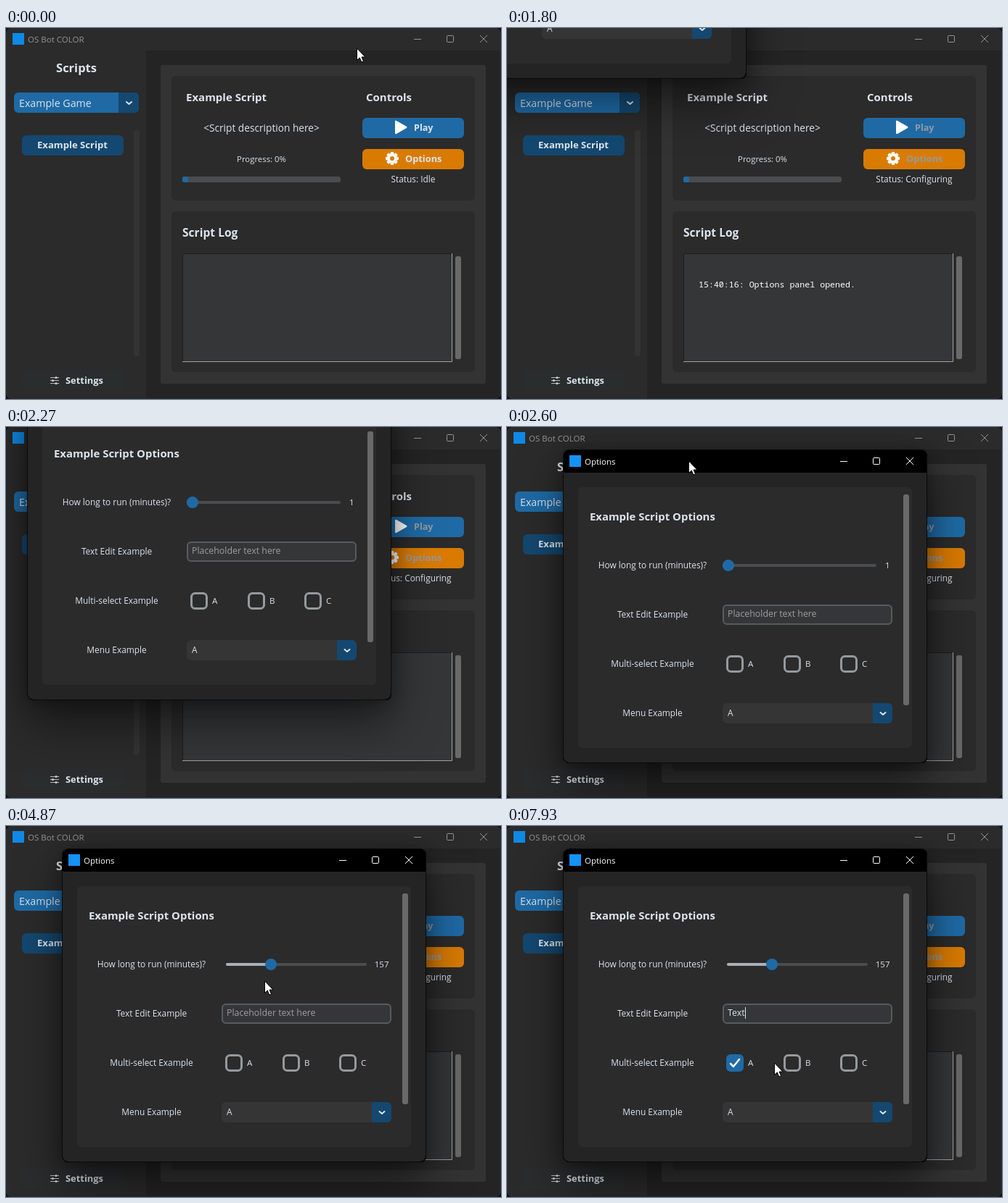
Recreate the animation shown at these times as an HTML page with a canvas. Size 682 by 512 pixels, loop 8 s.

```html
<!DOCTYPE html>
<html lang="en">
<head>
<meta charset="utf-8">
<title>Script options</title>
<style>
html, body { margin: 0; width: 100%; height: 100%; overflow: hidden; background: #10131f; }
canvas { display: block; }
</style>
</head>
<body>
<canvas id="stage" width="682" height="512"></canvas>
<script>
const ctx = document.getElementById('stage').getContext('2d');
const LOOP = 8000, STEP = 1000 / 15;
const BLUE = '#1f6aa5', NAVY = '#144870', CARD = '#2b2b2b', BODY = '#242424',
      INK = '#dce4ee', GREY = '#949a9f', FIELD = '#343638', TRACK = '#4a4d50', THUMB = '#696969';
const OPENED = 800, DRAG_START = 3430, FOCUSED = 5400, CHECKED = 7500;
const KEYS_TYPED = [5730, 6000, 6270, 6530];

// [time, x, y]
const DIALOG = [[1670, -290, -475], [1800, -249, -394], [2266, -48, -87], [2400, -12, -25], [2530, 0, 0]];
const SLIDER = [[DRAG_START, 66], [3800, 100], [4270, 161], [4400, 161], [4460, 157]];
// [time, x, y, shape until the next key]
const POINTER = [
  [0, 483, 28, 'arrow'], [530, 548, 167, 'hand'], [670, 556, 180, 'hand'], [870, 556, 180, 'hand'],
  [930, 505, 150, 'arrow'], [1200, -30, -40, 'arrow'], [1670, -40, -428, 'arrow'],
  [2266, 200, -40, 'arrow'], [2530, 250, 47, 'arrow'], [2600, 250, 47, 'arrow'],
  [3130, 318, 180, 'hand'], [3266, 331, 188, 'hand'], [DRAG_START, 331, 188, 'hand'],
  [4270, 367, 189, 'hand'], [4400, 367, 189, 'hand'], [4460, 365, 191, 'hand'],
  [4710, 365, 192, 'arrow'], [4866, 356, 214, 'arrow'], [5130, 352, 246, 'beam'],
  [5330, 351, 257, 'beam'], [6840, 351, 257, 'beam'], [7000, 342, 273, 'arrow'],
  [7270, 318, 317, 'hand'], [7400, 312, 331, 'hand'], [7660, 312, 331, 'hand'],
  [7790, 342, 329, 'arrow'], [7933, 368, 327, 'arrow'], [8000, 375, 326, 'arrow']
];

const SHAPES = {
  arrow: new Path2D('M.5 0V16.5L4.3 13L6.8 19L9.5 17.8L7 12H12Z'),
  hand: new Path2D('M-2 1Q0-2 2 1V8Q4 7 5 8.5Q7 8 8 9.5Q10 9 10.5 11V16Q10 19 8.5 21.5H0Q-2 17-6 13Q-6 10-3 12L-2 13Z'),
  beam: new Path2D('M-2.5-7.5H-.5L.5-6.5L1.5-7.5H3.5M.5-6.5V6.5M-2.5 7.5H-.5L.5 6.5L1.5 7.5H3.5')
};

function track(keys, t) {
  if (t <= keys[0][0]) return keys[0].slice(1);
  const i = keys.findIndex(k => k[0] > t);
  if (i < 0) return keys[keys.length - 1].slice(1);
  const a = keys[i - 1], b = keys[i], p = (t - a[0]) / (b[0] - a[0]);
  return a.slice(1).map((v, n) => typeof v === 'number' ? Math.round(v + (b[n + 1] - v) * p) : v);
}

function box(x, y, w, h, fill, r = 0) {
  ctx.fillStyle = fill;
  ctx.beginPath();
  ctx.roundRect(x, y, w, h, r);
  ctx.fill();
}

function outline(x, y, w, h, color, width, r = 0) {
  ctx.strokeStyle = color;
  ctx.lineWidth = width;
  ctx.beginPath();
  ctx.roundRect(x + width / 2, y + width / 2, w - width, h - width, r);
  ctx.stroke();
}

function line(points, color, width = 1) {
  ctx.strokeStyle = color;
  ctx.lineWidth = width;
  ctx.beginPath();
  points.forEach(([x, y]) => ctx.lineTo(x, y));
  ctx.stroke();
}

function text(str, x, y, size, { color = INK, bold = false, align = 'left', family = '"Open Sans", sans-serif' } = {}) {
  ctx.font = `${bold ? 700 : 400} ${size}px ${family}`;
  ctx.textAlign = align;
  ctx.fillStyle = color;
  ctx.fillText(str, x, y);
}

function disc(x, y, r, fill) {
  ctx.fillStyle = fill;
  ctx.beginPath();
  ctx.arc(x, y, r, 0, Math.PI * 2);
  ctx.fill();
}

function chevron(x, y) {
  ctx.lineCap = ctx.lineJoin = 'round';
  line([[x - 3.5, y - 1.5], [x, y + 1.5], [x + 3.5, y - 1.5]], INK, 2);
  ctx.lineCap = 'butt';
  ctx.lineJoin = 'miter';
}

function titleBar(label, x, y, right, color, logo) {
  box(x, y - 8, 16, 16, logo);
  text(label, x + 21, y + 5, 11.5, { color });
  line([[right - 96, y + .5], [right - 86, y + .5]], color);
  outline(right - 51, y - 5, 10, 10, color, 1, 1);
  line([[right - 5, y - 5], [right + 5, y + 5]], color);
  line([[right + 5, y - 5], [right - 5, y + 5]], color);
}

function gear(x, y) {
  ctx.save();
  ctx.translate(x, y);
  for (let i = 0; i < 8; i++) {
    box(-2.2, -9, 4.4, 5, '#fff', 1);
    ctx.rotate(Math.PI / 4);
  }
  ctx.restore();
  ctx.lineWidth = 4;
  ctx.strokeStyle = '#fff';
  ctx.beginPath();
  ctx.arc(x, y, 5, 0, Math.PI * 2);
  ctx.stroke();
}

function mainWindow(opened, hover) {
  box(0, 0, 682, 512, BODY, 8);
  box(0, 0, 682, 31, CARD, [8, 8, 0, 0]);
  box(0, 31, 193, 481, CARD, [0, 0, 0, 8]);
  outline(0, 0, 682, 512, '#262b3a', 1, 8);
  titleBar('OS Bot COLOR', 9, 15, 658, '#959595', '#1089e6');

  text('Scripts', 97, 61, 16.5, { bold: true, align: 'center' });
  box(11, 89, 172, 28, BLUE, 6);
  box(155, 89, 28, 28, NAVY, [0, 6, 6, 0]);
  text('Example Game', 18, 109, 14.2);
  chevron(169.5, 103.5);
  box(22, 148, 140, 28, NAVY, 6);
  text('Example Script', 91.5, 166, 13.1, { bold: true, align: 'center' });
  box(176, 141, 8, 312, '#333', 4);
  box(22, 472, 140, 28, '#2a2d2e', 6);
  [[482, 69], [486, 64.5], [490, 69]].forEach(([y, knob]) => {
    line([[61, y + .5], [73, y + .5]], '#bbb');
    disc(knob, y + .5, 1.6, '#ccc');
  });
  text('Settings', 82, 491, 12.9, { bold: true });

  box(213, 51, 448, 440, '#333', 3);
  box(228, 66, 418, 172, CARD, 6);
  box(228, 253, 418, 222, CARD, 6);
  text('Example Script', 248, 101, 15, { bold: true });
  text('Controls', 496, 101, 15, { bold: true });
  text('<Script description here>', 352, 143, 13.7, { align: 'center' });
  text('Progress: 0%', 352, 185, 11.4, { align: 'center' });
  box(243, 205, 218, 8, TRACK, 3);
  box(243, 205, 8, 8, BLUE, 3);

  const label = opened ? GREY : INK;
  box(491, 124, 140, 28, BLUE, 6);
  ctx.fillStyle = '#fff';
  ctx.fill(new Path2D('M536 129Q536 127 538 128L552 136Q553 137 552 138L538 146Q536 147 536 145Z'));
  text('Play', 562, 142, 12.6, { bold: true, color: label });
  box(491, 167, 140, 28, hover ? '#b36602' : '#d97b00', 6);
  gear(532, 180);
  text('Options', 550, 185, 12.8, { bold: true, color: label });
  text('Status: ' + (opened ? 'Configuring' : 'Idle'), 561, 213, 11.9, { align: 'center' });

  text('Script Log', 243, 288, 15.6, { bold: true });
  box(243, 311, 372, 150, FIELD);
  line([[243.5, 460], [243.5, 311.5], [614, 311.5]], '#1c1c1c');
  line([[243, 460.5], [614.5, 460.5], [614.5, 311]], '#a0a0a0');
  box(619, 315, 8, 142, THUMB, 3);
  if (opened) text('15:40:16: Options panel opened.', 264, 358, 11.62, { color: '#fff', family: '"Noto Sans Mono", monospace' });
}

function shadow(alpha, blur, dy) {
  ctx.shadowColor = `rgba(0,0,0,${alpha})`;
  ctx.shadowBlur = blur;
  ctx.shadowOffsetY = dy;
  box(78, 32, 501, 432, '#000', 8);
  ctx.shadowColor = 'transparent';
}

function slider(value, hover) {
  const extra = String(value).length - 1;
  const left = 297 + 3 * extra, right = 509 - 6 * extra;
  const knob = left + 8 + (value - 1) / 514 * (right - left - 16);
  box(left, 189, right - left, 4, TRACK, 2);
  box(left, 189, knob - left, 4, '#aab0b5', 2);
  disc(knob, 191, 8, hover ? NAVY : BLUE);
  text(value, 527.5, 195, 11.5, { align: 'right' });
}

function entry(t) {
  box(297, 245, 234, 28, FIELD, 6);
  outline(297, 245, 234, 28, '#565b5e', 2, 5);
  if (t < FOCUSED) return text('Placeholder text here', 304, 262, 12.36, { color: '#9e9e9e' });
  const typed = 'Text'.slice(0, KEYS_TYPED.filter(k => k <= t).length);
  text(typed, 304, 262, 12.36);
  if ((t - 5100) % 900 < 600) box(Math.ceil(304 + ctx.measureText(typed).width), 250, 1, 16, INK);
}

function checkbox(label, x, checked, hover) {
  if (checked || hover) box(x, 315, 24, 24, hover ? NAVY : BLUE, 6);
  if (!checked) outline(x, 315, 24, 24, GREY, 3, 5);
  else {
    ctx.lineCap = 'round';
    line([[x + 6, 328], [x + 10, 332], [x + 18, 322]], '#fff', 2.5);
    ctx.lineCap = 'butt';
  }
  text(label, x + 30, 331, 11.6);
}

function dialog(t, shape) {
  ctx.save();
  ctx.translate(...track(DIALOG, t));
  shadow(.5, 64, 30);
  shadow(.3, 21, 2);
  box(78, 62, 500, 401, BODY, [0, 0, 8, 8]);
  outline(77, 31, 502, 433, '#0a0a0a', 1, 8);
  box(79, 32, 499, 31, '#000', [8, 8, 0, 0]);
  titleBar('Options', 86, 47, 555, '#fff', '#1492f5');
  box(98, 83, 460, 360, CARD, 6);
  box(546, 93, 8, 291, THUMB, 3);
  text('Example Script Options', 114, 129, 14.9, { bold: true });
  ['How long to run (minutes)?', 'Text Edit Example', 'Multi-select Example', 'Menu Example']
    .forEach((label, i) => text(label, 200.5, 195 + i * 68, 11.88, { align: 'center' }));

  const hand = shape === 'hand';
  slider(t < DRAG_START ? 1 : track(SLIDER, t)[0], hand && t < 5000);
  entry(t);
  checkbox('A', 302, t >= CHECKED, hand && t > 7000);
  checkbox('B', 381);
  checkbox('C', 459);
  box(297, 381, 234, 28, '#353535', 6);
  box(504, 381, 27, 28, NAVY, [0, 6, 6, 0]);
  text('A', 304, 399, 11.9);
  chevron(518, 395.5);
  ctx.restore();
}

function pointer(x, y, shape) {
  ctx.save();
  ctx.translate(x, y);
  ctx.lineWidth = 1;
  if (shape === 'beam') {
    ctx.strokeStyle = '#ddd';
  } else {
    ctx.strokeStyle = '#000';
    ctx.fillStyle = '#fff';
    ctx.fill(SHAPES[shape]);
  }
  ctx.stroke(SHAPES[shape]);
  ctx.restore();
}

function draw(now) {
  const t = Math.floor((now % LOOP + 5) / STEP) * STEP % LOOP;
  const [x, y, shape] = track(POINTER, t);
  ctx.clearRect(0, 0, 682, 512);
  mainWindow(t >= OPENED, shape === 'hand' && t < 1000);
  if (t > DIALOG[0][0]) dialog(t, shape);
  pointer(x, y, shape);
  requestAnimationFrame(draw);
}
requestAnimationFrame(draw);
</script>
</body>
</html>
```
